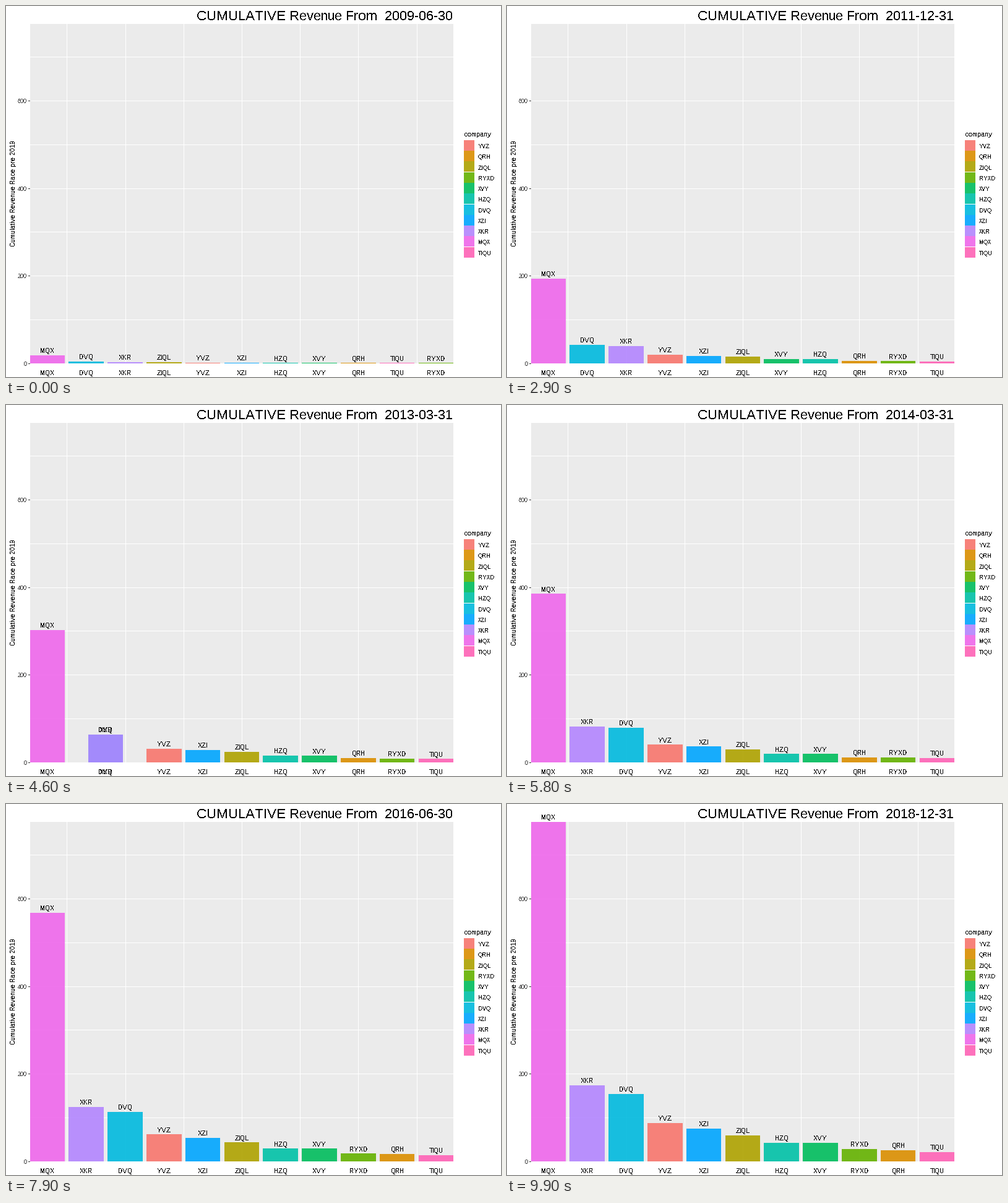
Recreate the animation shown at these times as a matplotlib script. Size 800 by 600 pixels, loop 10 s.

```python
import matplotlib.pyplot as plt
import numpy as np
from matplotlib.animation import FuncAnimation
from matplotlib.patches import Rectangle

plt.rcParams.update({
    "font.family": "Liberation Sans",
    "text.antialiased": False,
    "text.hinting": "native",
    "text.hinting_factor": 1,
    "text.kerning_factor": 6,
})

W, H, DPI = 800, 600, 100
LEFT, RIGHT, TOP, BASE = 39, 723, 29, 578
X0, STEP = 38.65, 62.8          # left edge of the first bar, distance per rank
BAR = 0.9 * STEP
UNIT = 0.7075                   # pixels per unit of revenue

# Cumulative revenue at a few quarters, in legend order
QUARTERS = [0, 5, 10, 15.5, 24, 32.5, 38]
COMPANIES = {
    "YVZ": ("#F8766D", [1.8, 9.9, 19.8, 31, 51, 73.5, 87.6]),
    "QRH": ("#DB8E00", [0.8, 2.8, 5.8, 9.9, 14.2, 21.2, 25.4]),
    "ZIQL": ("#AEA200", [3, 8.4, 15.6, 24, 36.8, 51, 59.4]),
    "RYXD": ("#64B200", [0.75, 2.3, 5.4, 9, 14.1, 22.6, 28.3]),
    "XVY": ("#00BD5C", [0.9, 4.2, 9.9, 15.4, 24, 35, 42.4]),
    "HZQ": ("#00C1A7", [1, 4.3, 9.8, 15.6, 24.1, 35.4, 42.5]),
    "DVQ": ("#00BADE", [4.3, 24, 42.4, 63.6, 97.5, 131.5, 154]),
    "XZI": ("#00A6FF", [1.7, 7.2, 17, 28.3, 45.2, 63.6, 75]),
    "XKR": ("#B385FF", [3, 18.4, 39.6, 63.6, 103.2, 148.4, 174]),
    "MQX": ("#EF67EB", [18.4, 101.8, 193.6, 302.5, 479, 670, 776]),
    "TIQU": ("#FF63B6", [0.8, 2.5, 4.6, 8.1, 12.4, 17, 21.2]),
}
START = ["MQX", "DVQ", "XKR", "ZIQL", "YVZ", "XZI",
         "HZQ", "XVY", "QRH", "TIQU", "RYXD"]
# Quarter at which two neighbours have changed places
SWAPS = [(3, "ZIQL", "YVZ"), (7, "HZQ", "XVY"), (7, "TIQU", "RYXD"),
         (8, "ZIQL", "XZI"), (14, "XVY", "HZQ"), (16, "DVQ", "XKR"),
         (26, "QRH", "RYXD")]

fig = plt.figure(figsize=(W / DPI, H / DPI), dpi=DPI, facecolor="white")
ax = fig.add_axes([0, 0, 1, 1])
ax.set(xlim=(0, W), ylim=(H, 0))
ax.axis("off")


def rect(x, y, w, h, color, alpha=1, z=1):
    return ax.add_patch(Rectangle((x, y), w, h, fc=color, ec="none", lw=0,
                                  alpha=alpha, antialiased=False, zorder=z))


def text(x, y, s, px, ha="left", color="black", **kw):
    return ax.text(x, y, s, size=px * 72 / DPI, ha=ha, va="baseline",
                   color=color, zorder=5, **kw)


def ranks(quarter):
    order = list(START)
    for when, a, b in SWAPS:
        if when <= quarter:
            i, j = order.index(a), order.index(b)
            order[i], order[j] = b, a
    return {name: i for i, name in enumerate(order)}


def quarter_end(quarter):
    year, q = divmod(quarter + 1, 4)
    return f"{2009 + year}-" + ("03-31", "06-30", "09-30", "12-31")[q]


def timeline(frame):
    """Early quarters rest for one extra frame, later ones do not."""
    if frame < 72:
        k, r = divmod(frame, 3)
        return k + r / 2
    return 24 + (frame - 71) / 2


def draw_panel():
    rect(LEFT, TOP, RIGHT - LEFT, BASE - TOP, "#EBEBEB")
    for v in range(100, 701, 100):
        rect(LEFT, int(BASE - UNIT * v), RIGHT - LEFT, 1, "white")
    for v in np.arange(1.5, 11, 1.5):
        rect(round(X0 + STEP * (v - 0.55)), TOP, 1, BASE - TOP, "white")
    for v in range(0, 601, 200):
        y = int(BASE - UNIT * v)
        rect(36, y, 3, 1, "#333333")
        text(34, y + 4, str(v), 9, ha="right", color="#4D4D4D")
    text(15, 303, "Cumulative Revenue Race pre 2019", 11, ha="center",
         rotation=90, rotation_mode="anchor")


def draw_legend():
    text(740, 211, "company", 11)
    for i, (name, (color, _)) in enumerate(COMPANIES.items()):
        y = 217.35 + 17.28 * i
        rect(740, int(y), 17, 17, "#F2F2F2")
        rect(740, int(y), 17, 17, color, alpha=0.9, z=2)
        text(763, round(y + 12.6), name, 9)


draw_panel()
draw_legend()
title = text(308, 23, "", 22)
bars = {n: rect(0, BASE, 1, 0, c, alpha=0.9, z=3)
        for n, (c, _) in COMPANIES.items()}
tops = {n: text(0, 0, n, 11, ha="center") for n in COMPANIES}
feet = {n: text(0, 597, n, 11, ha="center") for n in COMPANIES}


def update(frame):
    t = timeline(frame)
    now, nxt = ranks(int(t)), ranks(int(np.ceil(t)))
    title.set_text("CUMULATIVE Revenue From  " + quarter_end(int(t)))
    for name, (_, values) in COMPANIES.items():
        left = X0 + STEP * (now[name] + nxt[name]) / 2
        y = BASE - UNIT * np.interp(t, QUARTERS, values)
        x, top = round(left), round(y)
        bars[name].set_bounds(x, top, round(left + BAR) - x, BASE - top)
        mid = left + BAR / 2
        tops[name].set_position((mid, round(y - 3.6)))
        feet[name].set_x(mid)


anim = FuncAnimation(fig, update, frames=100, interval=100, repeat=True,
                     cache_frame_data=False)
plt.show()
```
